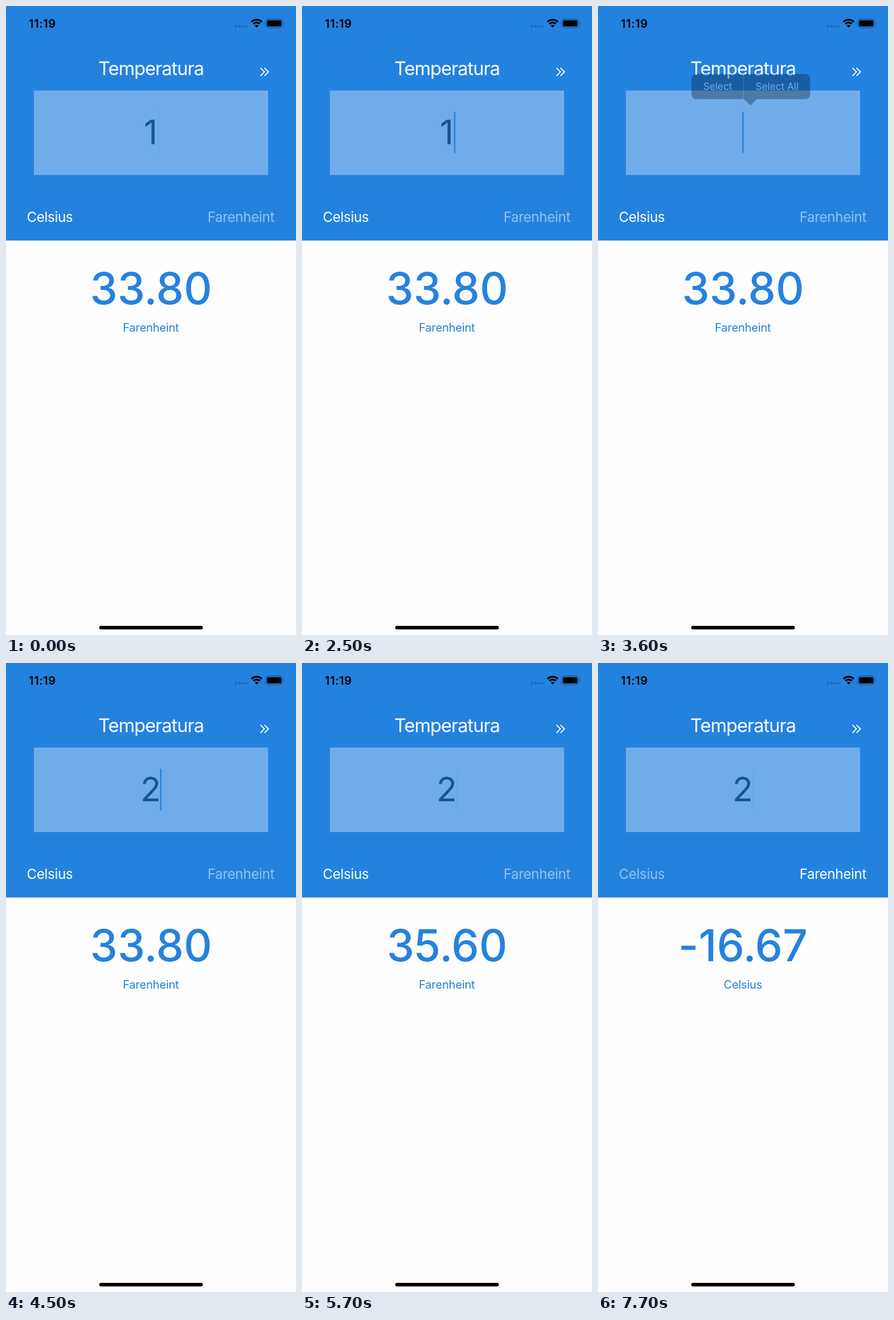
Recreate the animation shown at these times as an HTML page. Size 509 by 1101 pixels, loop 8 s.

```html
<!DOCTYPE html>
<html lang="en">
<head>
<meta charset="utf-8">
<title>Temperatura</title>
<style>
  html, body { margin: 0; width: 100%; height: 100%; overflow: hidden; background: #fefdff; }
  svg { display: block; width: 100%; height: 100%; }
  text { font-family: Inter, Roboto, sans-serif; font-optical-sizing: none; }
  .mid { text-anchor: middle; }
  .end { text-anchor: end; }
  .title { font-size: 32.6px; letter-spacing: -1px; fill: #fff; }
  .clock { font-size: 20px; font-weight: 600; letter-spacing: .6px; }
  .input { font-size: 59px; fill: #175591; }
  .unit { font-size: 24.2px; letter-spacing: -.35px; fill: #fff; }
  .result { font-size: 77px; font-weight: 500; letter-spacing: -.1px; fill: #2482df; }
  .label { font-size: 20.2px; letter-spacing: -.25px; fill: #2482df; }
  .menu { font-size: 17.2px; fill: #fff; }
</style>
</head>
<body>
<svg viewBox="0 0 509 1101" preserveAspectRatio="none">
  <rect width="509" height="1101" fill="#fefdff"/>
  <rect width="509" height="410.5" fill="#2482df"/>

  <!-- status bar -->
  <text class="clock" x="40.1" y="37.5">11:19</text>
  <path d="M403.6 35.5H423" stroke="#1d69b5" stroke-width="4.8" stroke-dasharray="0 6.1" stroke-linecap="round"/>
  <g fill="none" stroke="#000" stroke-width="3.2">
    <path d="M430.8 27.8A13 13 0 0 1 449.2 27.8M434.3 31.3A8 8 0 0 1 445.7 31.3"/>
    <path d="M440 37.8L436.6 34.3A4.8 4.8 0 0 1 443.4 34.3Z" fill="#000" stroke="none"/>
  </g>
  <rect x="456" y="23" width="29.4" height="14.8" rx="4.2" fill="none" stroke="#000" stroke-opacity=".38" stroke-width="1.3"/>
  <rect x="458" y="25" width="25.4" height="10.8" rx="2.5"/>
  <path d="M486.8 28.2Q488.6 30.4 486.8 32.6Z" fill-opacity=".5"/>

  <!-- header -->
  <text class="title mid" x="254.5" y="121.3">Temperatura</text>
  <path d="M446.6 108.3L453.6 115.3L446.6 122.3M453.6 108.3L460.6 115.3L453.6 122.3" fill="none" stroke="#fff" stroke-width="1.8"/>
  <rect x="49" y="148" width="411" height="148" fill="#70ace9"/>
  <text class="input mid" id="input" x="254" y="242"></text>
  <rect id="cursor" y="185" width="2.6" height="72.5" fill="#2b81d9"/>
  <text class="unit" id="celsius" x="36.4" y="378">Celsius</text>
  <text class="unit end" id="farenheint" x="471" y="378">Farenheint</text>

  <!-- result -->
  <text class="result mid" id="result" x="254.5" y="522"></text>
  <text class="label mid" id="label" x="254.3" y="569.7"></text>

  <g id="menu">
    <path d="M174 119H362.5Q372.5 119 372.5 129V153Q372.5 163 362.5 163H279L267.5 174L256 163H174Q164 163 164 153V129Q164 119 174 119Z" fill="#04172a"/>
    <path d="M255.5 119V163" stroke="#48627c" stroke-width="1.2"/>
    <text class="menu mid" x="210" y="146.5">Select</text>
    <text class="menu mid" x="314.3" y="146.5">Select All</text>
  </g>

  <rect x="163.5" y="1085" width="182" height="6.2" rx="3.1"/>
</svg>
<script>
  const LOOP = 8000, STEP = 100;
  const MENU = 2500, ERASE = 3500, TYPE = 4500;
  const TAP_C = 5200, TAP_F = 6600, HOLD = 200, RELEASE = 300;

  const el = id => document.getElementById(id);
  const clamp = v => Math.min(1, Math.max(0, v));
  const mix = (a, b, k) => a + (b - a) * clamp(k);
  const fade = (id, v) => el(id).setAttribute("opacity", v);

  // One blink per second: quick rise, short hold, slower fall.
  function blink(ms, start) {
    const p = (ms - start + LOOP) % 1000;
    return Math.min(clamp((p + 50) / 100), clamp((620 - p) / 220));
  }

  function cursor(ms) {
    if (ms < ERASE) return blink(ms, 400);
    return ms < TYPE ? 1 : blink(ms, 100);
  }

  // A touched label dims, then returns to its resting opacity.
  function touch(ms, tap, rest) {
    const dim = .25, t = ms - tap;
    return t < HOLD ? mix(rest, dim, (t + STEP) / HOLD) : mix(dim, rest, (t - HOLD) / RELEASE);
  }

  function draw(time) {
    const ms = Math.floor(time % LOOP / STEP) * STEP;

    const digit = ms < ERASE ? "1" : ms < TYPE ? "" : "2";
    const caret = { "1": 268, "": 254.5, "2": 271.8 }[digit];
    el("input").textContent = digit;
    el("cursor").setAttribute("x", caret - 1.3);
    fade("cursor", cursor(ms));
    fade("menu", Math.min(clamp((ms - MENU) / 300), clamp((ERASE + 200 - ms) / 300)));

    const toCelsius = ms >= TAP_F + HOLD;
    const degrees = ms < TAP_C + HOLD ? 1 : 2;
    const value = toCelsius ? (degrees - 32) / 1.8 : degrees * 1.8 + 32;
    el("result").textContent = value.toFixed(2);
    el("label").textContent = toCelsius ? "Celsius" : "Farenheint";
    fade("celsius", touch(ms, TAP_C, toCelsius ? .5 : 1));
    fade("farenheint", touch(ms, TAP_F, toCelsius ? 1 : .5));
  }

  const start = performance.now();
  function tick() {
    draw(performance.now() - start);
    requestAnimationFrame(tick);
  }
  tick();
</script>
</body>
</html>
```
